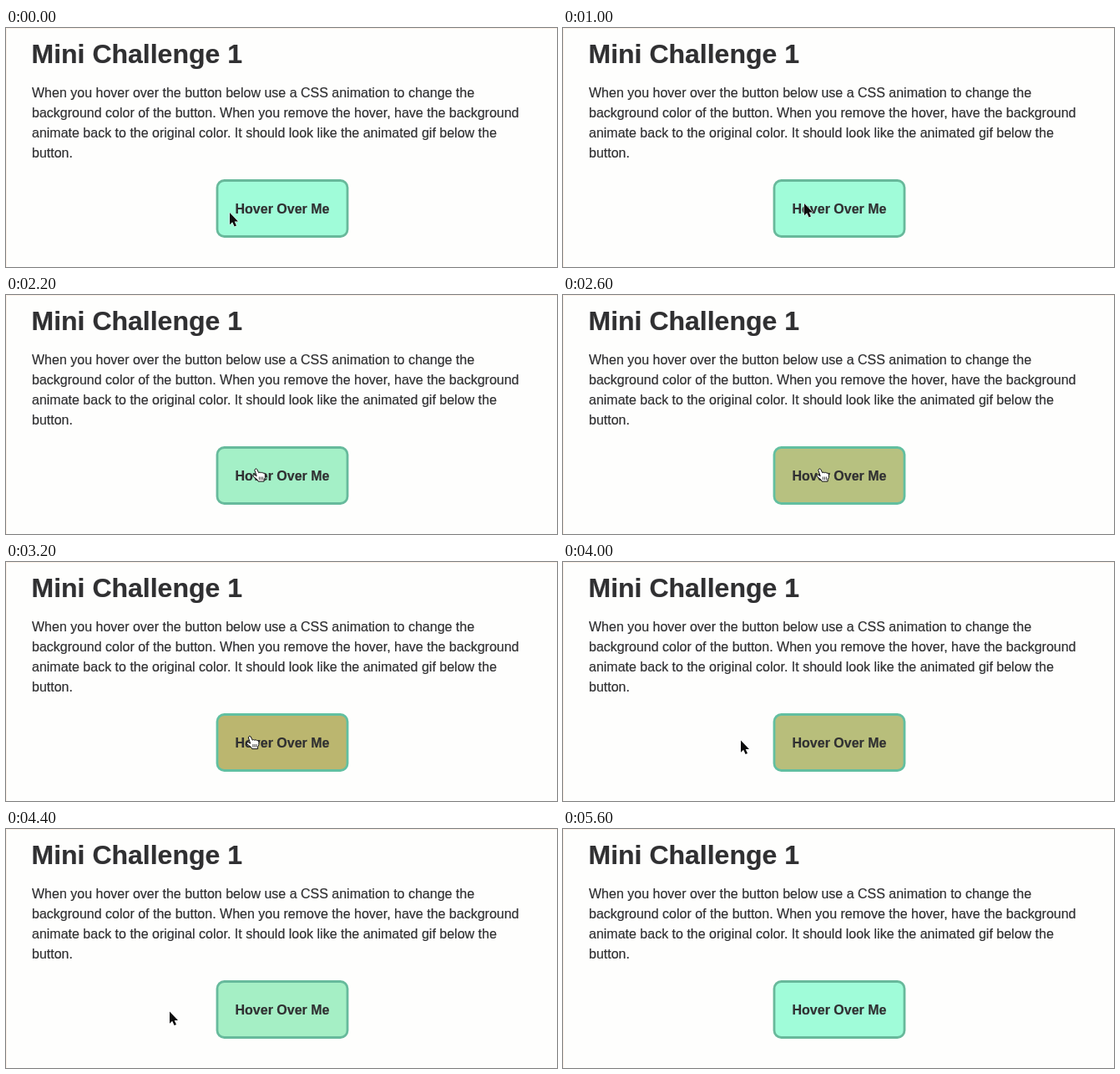
Recreate the animation shown at these times as an HTML page. Size 660 px wide and 286 px high, loop 6200 ms.

```html
<!DOCTYPE html>
<html lang="en">
<head>
<meta charset="utf-8">
<title>Mini Challenge 1</title>
<style>
html, body { margin: 0; width: 100%; height: 100%; overflow: hidden; background: #fefefd; }
svg { display: block; width: 660px; height: 286px; font-family: "Liberation Sans", Arial, sans-serif; font-size: 16px; }
text { fill: #303032; stroke: #303032; stroke-width: .2; }
.bold { font-weight: bold; }
</style>
</head>
<body>
<svg viewBox="0 0 660 286">
  <path d="M.5 286V.5H660" fill="none" stroke="#fdf1e8"/>
  <text class="bold" x="30.5" y="42.3" font-size="32">Mini Challenge 1</text>
  <text y="58.6">
    <tspan x="31" dy="24">When you hover over the button below use a CSS animation to change the</tspan>
    <tspan x="31" dy="24">background color of the button. When you remove the hover, have the background</tspan>
    <tspan x="31" dy="24">animate back to the original color. It should look like the animated gif below the</tspan>
    <tspan x="31" dy="24">button.</tspan>
  </text>
  <rect id="button" x="253" y="182.5" width="156" height="67" rx="8.5" stroke-width="2.8"/>
  <text class="bold" x="331" y="221.7" text-anchor="middle">Hover Over Me</text>
  <path id="arrow" d="M0 0V14.2L3.2 11.3L5.6 16.6L8 15.5L5.7 10.4H10Z" fill="#0c0c0c" stroke="#fff" paint-order="stroke" stroke-linejoin="round"/>
  <g id="hand" stroke="#111" stroke-linejoin="round" stroke-linecap="round">
    <path d="M-.6 1.6Q.6-1 2.2 1L4.2 5.2Q5.6 3.8 6.8 5.2Q8.4 4.2 9.4 5.6Q11.8 5 11.9 7.5V11L10.6 13.2V15.6H3.6L2.8 13.8L-2.4 9.6Q-3.6 6.6-1 7.6L1.4 9Z" fill="#fff"/>
    <path d="M4.9 10.4v3m2.1-3v3m2.1-3v3" fill="none" stroke-width=".8"/>
  </g>
</svg>
<script>
const LOOP = 6200, STEP = 200, FADE = 1000, GLIDE = 400;
const ENTER = 2060, LEAVE = 3890, HIDE = 5600;
const $ = id => document.getElementById(id);
const button = $("button"), arrow = $("arrow"), hand = $("hand");

const idle = { fill: [160, 252, 217], line: [104, 185, 155] };
const hover = { fill: [187, 182, 111], line: [97, 192, 161] };

// The pointer rests, then glides to arrive at each stop on time
const stops = [
  { at: 0, x: 268, y: 221 },
  { at: 600, x: 302, y: 212 },
  { at: 1000, x: 289, y: 210 },
  { at: 1600, x: 192, y: 233 },
  { at: 1800, x: 260, y: 214 },
  { at: 2200, x: 298.5, y: 207.5 },
  { at: 2600, x: 306.5, y: 207.5 },
  { at: 3200, x: 291, y: 208 },
  { at: 4000, x: 213, y: 213.5 },
  { at: 4400, x: 196, y: 218.5 },
  { at: 5400, x: 170, y: 254 }
];

const clamp = v => Math.min(1, Math.max(0, v));
const lerp = (a, b, k) => a + (b - a) * k;
const mix = (a, b, k) => `rgb(${a.map((v, i) => Math.round(lerp(v, b[i], k)))})`;
const show = (el, on) => el.setAttribute("visibility", on ? "visible" : "hidden");

// The CSS "ease" curve, solved by bisection
function ease(t) {
  const curve = (s, a, b) => 3 * (1 - s) ** 2 * s * a + 3 * (1 - s) * s * s * b + s ** 3;
  let lo = 0, hi = 1;
  for (let i = 0; i < 24; i++) {
    const mid = (lo + hi) / 2;
    if (curve(mid, .25, .25) < t) lo = mid; else hi = mid;
  }
  return curve(lo, .1, 1);
}

function pointerAt(t) {
  const next = stops.findIndex(s => s.at > t);
  if (next < 0) return stops[stops.length - 1];
  const a = stops[next - 1], b = stops[next];
  const k = clamp(1 - (b.at - t) / Math.min(GLIDE, b.at - a.at));
  return { x: lerp(a.x, b.x, k), y: lerp(a.y, b.y, k) };
}

function draw(time) {
  const t = Math.floor(time % LOOP / STEP) * STEP;
  const k = ease(clamp((t - ENTER) / FADE)) - ease(clamp((t - LEAVE) / FADE));
  button.setAttribute("fill", mix(idle.fill, hover.fill, k));
  button.setAttribute("stroke", mix(idle.line, hover.line, k));

  const { x, y } = pointerAt(t);
  const over = t > ENTER && t < LEAVE - STEP / 2 + 1;
  (over ? hand : arrow).setAttribute("transform", `translate(${x} ${y})`);
  show(hand, over);
  show(arrow, !over && t < HIDE);
}

const start = performance.now();
function tick() {
  draw(performance.now() - start);
  requestAnimationFrame(tick);
}
tick();
</script>
</body>
</html>
```
